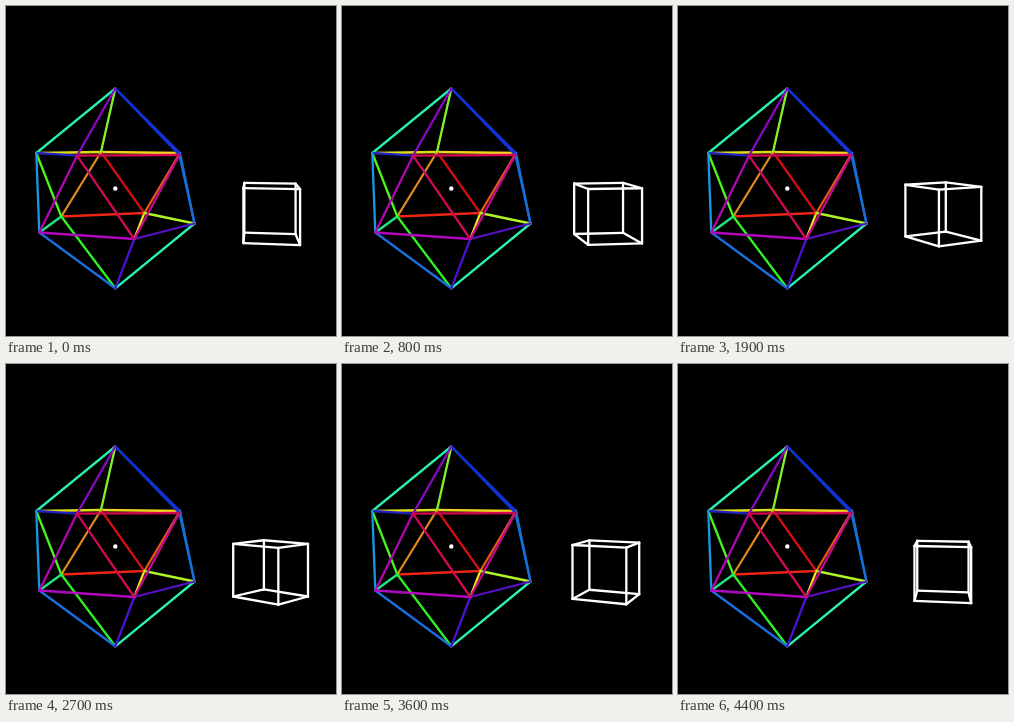
These frames come from a looping animation (330 px wide and 330 px high, 4.5 s). An HTML page with a canvas:

```html
<!DOCTYPE html>
<html>
<head>
<meta charset="utf-8">
<style>
html, body { margin: 0; width: 100%; height: 100%; overflow: hidden; background: #000; }
canvas { display: block; }
</style>
</head>
<body>
<canvas id="stage" width="330" height="330"></canvas>
<script>
const ctx = document.getElementById('stage').getContext('2d');

// Icosahedron corners: top T, upper ring A-E, lower ring P-W, bottom X
const corners = {
  T: [109.3, 82.5], X: [109.3, 282.3],
  A: [30.3, 147], B: [71, 149.7], C: [173.4, 149], D: [174, 147], E: [95, 146],
  P: [33.3, 226.5], Q: [128.3, 233], S: [188.5, 217.5], U: [138.3, 207], W: [55.3, 210.5]
};

// Edges with their colours, far ones first; XU lies hidden behind XQ below Q
const edges = `QU #e8e620, EA #dcdc18, DE #f0d020, UW #ee2414, EU #d40c14,
  EW #e08a1c, DU #e05a18, SU #b0f428, AW #4cf41c, TE #84f428, XW #2cf420,
  WP #20e880, CD #d01050, TD #1034d4, DS #1470d8, TA #28f0a8, AB #2020c0,
  AP #1898dc, CS #1470d8, TC #1034d4, XS #28f4b8, XP #1870e0, XQ #4814d0,
  QS #5810c8, TB #8c08c4, PQ #b008bc, BP #b008b0, CQ #c80890, BQ #d00858,
  BC #d00850`.split(',').map(e => e.trim().split(' '));

const VANISH = [165, 127], CENTER_X = 99.6, TOP = 52.8, BOTTOM = 105.5;
const RADIUS = 37.4, DEPTH = 0.072;

function line([x1, y1], [x2, y2], color) {
  ctx.strokeStyle = color;
  ctx.beginPath();
  ctx.moveTo(x1, y1);
  ctx.lineTo(x2, y2);
  ctx.stroke();
}

function project(angle, y) {
  const scale = 1 / (1 - DEPTH * Math.cos(angle));
  return [
    VANISH[0] + (CENTER_X + RADIUS * Math.sin(angle)) * scale,
    VANISH[1] + y * scale
  ];
}

function drawCube(turn) {
  for (let i = 0; i < 4; i++) {
    const a = turn + i * Math.PI / 2, b = a + Math.PI / 2;
    line(project(a, TOP), project(b, TOP), '#fff');
    line(project(a, BOTTOM), project(b, BOTTOM), '#fff');
    line(project(a, TOP), project(a, BOTTOM), '#fff');
  }
}

function draw(now) {
  const step = Math.floor(now / 100) % 45;
  ctx.fillStyle = '#000';
  ctx.fillRect(0, 0, 330, 330);
  ctx.lineWidth = 2.3;
  ctx.lineCap = 'round';
  for (const [[a, b], color] of edges) line(corners[a], corners[b], color);
  ctx.fillStyle = '#fff';
  ctx.beginPath();
  ctx.arc(109.3, 182.5, 2.2, 0, 2 * Math.PI);
  ctx.fill();
  drawCube((step - 27) * Math.PI / 90);
}

const start = performance.now();
function tick() {
  draw(performance.now() - start);
  requestAnimationFrame(tick);
}
tick();
</script>
</body>
</html>
```
